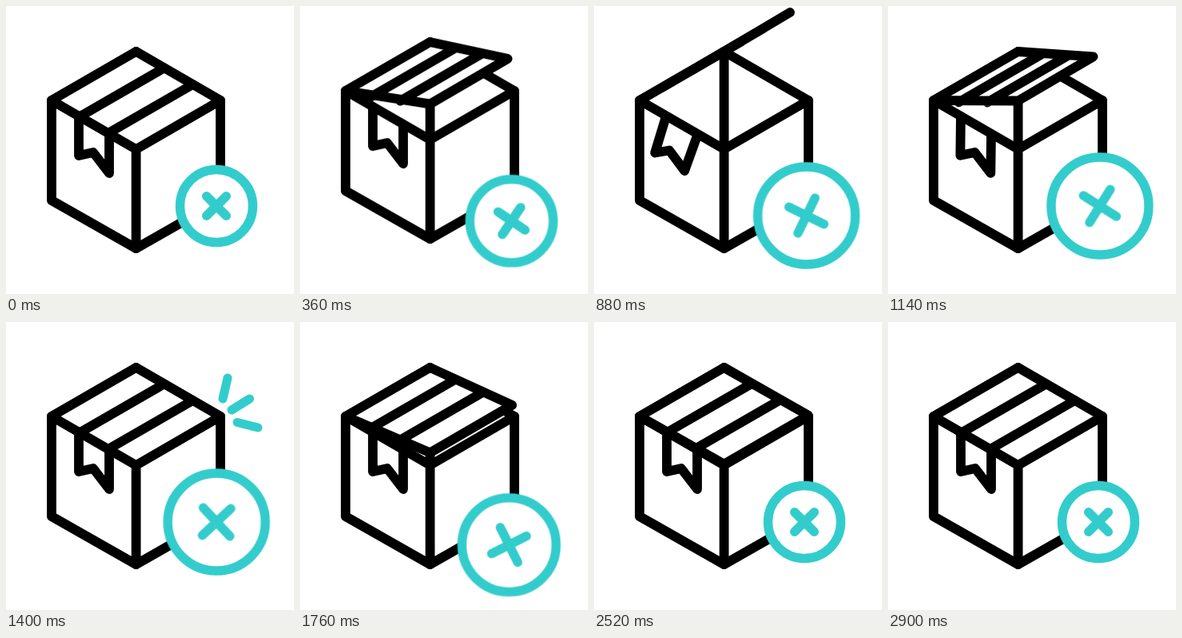
An HTML page for the animation above (3000 ms loop, 360x360 px).

```html
<!DOCTYPE html>
<html lang="en">
<head>
<meta charset="utf-8">
<title>Parcel cancelled</title>
<style>
  html, body { margin: 0; width: 100%; height: 100%; overflow: hidden; background: #fff; }
  svg { display: block; width: 100%; height: 100%; }
  svg * {
    stroke-linecap: round; stroke-linejoin: round;
    animation: 3s cubic-bezier(.333, 0, .667, 1) infinite;
  }
  .box { fill: #fff; stroke: #000; stroke-width: 11.8; animation-name: hop; }
  .lid { animation-name: lid; }
  .tag { animation-name: tag; }
  .rays { fill: none; stroke: #3cc; stroke-width: 11; }
  .rays path { stroke-dasharray: 1 4; stroke-dashoffset: 1.02; animation-name: burst; }
  .badge { fill: #fff; stroke: #3cc; stroke-width: 11.4; animation-name: bob; }
  .sway { animation-name: sway; }
  .ring { animation-name: ring; }
  .turn { animation-name: turn; }
  .cross { animation-name: cross; }

  @keyframes hop {
    0%, 6%, 18%, 100% { transform: translateY(0); }
    11.67% { transform: translateY(-12px); }
  }
  /* The lid hinges on its back-left edge: shut, wide open, shut, ajar, shut */
  @keyframes lid {
    0%, 4.67%, 44%, 50%, 86.67%, 100% {
      d: path("M57 118 L162.6 57 L268 118 L162.6 179 Z M92 138.3 L197.8 77.3 M128 158.9 L233.6 98");
    }
    22.67%, 32% {
      d: path("M57 118 L162.6 57 L245 8 L162.6 57 Z M84.6 102.1 L184.3 44.3 M120.6 81.4 L212.2 27.6");
    }
    66.67% {
      d: path("M57 118 L162.6 57 L262.5 91.6 L162.6 149.7 Z M87.2 127 L191.4 66.9 M122.7 137.7 L224.7 78.5");
    }
  }
  @keyframes tag {
    0%, 18.67%, 39.33%, 100% { d: path("M91 138 L91 187 L109 183 L129 209 L129 160"); }
    28.67% { d: path("M90 138 L76 183.5 L94 180.5 L113 206 L129 162"); }
  }
  @keyframes burst {
    0%, 43.33% { stroke-dashoffset: 1.02; }
    46.67% { stroke-dashoffset: 0; }
    53.33%, 100% { stroke-dashoffset: -1.02; }
  }
  @keyframes bob {
    0%, 36%, 46.67%, 77.33%, 100% { translate: 0 0; }
    20.67% { translate: 0 30px; }
    57.33% { translate: 0 29px; }
  }
  @keyframes sway {
    0%, 74.67%, 100% { transform: translateX(0); }
    22.67%, 30% { transform: translateX(2.6px); }
    61.33% { transform: translateX(-1.8px); }
  }
  @keyframes ring {
    0%, 80.67%, 100% { r: 45.5px; }
    26.67%, 52% { r: 61px; }
  }
  @keyframes turn {
    0%, 74.67%, 100% { transform: rotate(0deg); }
    22.67% { transform: rotate(-20deg); }
    30% { transform: rotate(-19deg); }
    61.33% { transform: rotate(19deg); }
  }
  @keyframes cross {
    0%, 83.33%, 100% { d: path("M-12.3 -12.3 L12.3 12.3 M12.3 -12.3 L-12.3 12.3"); }
    26.67%, 58.67% { d: path("M-17.2 -17.2 L17.2 17.2 M17.2 -17.2 L-17.2 17.2"); }
  }
</style>
</head>
<body>
<svg viewBox="0 0 360 360">
  <g class="box">
    <path d="M57 118 L162.6 57 L268 118 V243 L162.6 303 L57 243 Z"/>
    <path d="M162.6 57 V303 M57 118 L162.6 179 L268 118" fill="none"/>
    <path class="lid" d="M57 118 L162.6 57 L268 118 L162.6 179 Z M92 138.3 L197.8 77.3 M128 158.9 L233.6 98"/>
    <path class="tag" d="M91 138 L91 187 L109 183 L129 209 L129 160" fill="none"/>
  </g>
  <g class="rays">
    <path pathLength="1" d="M271 96 L277 70"/>
    <path pathLength="1" d="M282 110 L304.5 96"/>
    <path pathLength="1" d="M289 125.5 L315 132"/>
  </g>
  <g transform="translate(263 250)">
    <g class="badge">
      <g class="sway">
        <circle class="ring" r="45.5"/>
        <g class="turn">
          <path class="cross" d="M-12.3 -12.3 L12.3 12.3 M12.3 -12.3 L-12.3 12.3" fill="none"/>
        </g>
      </g>
    </g>
  </g>
</svg>
</body>
</html>
```
